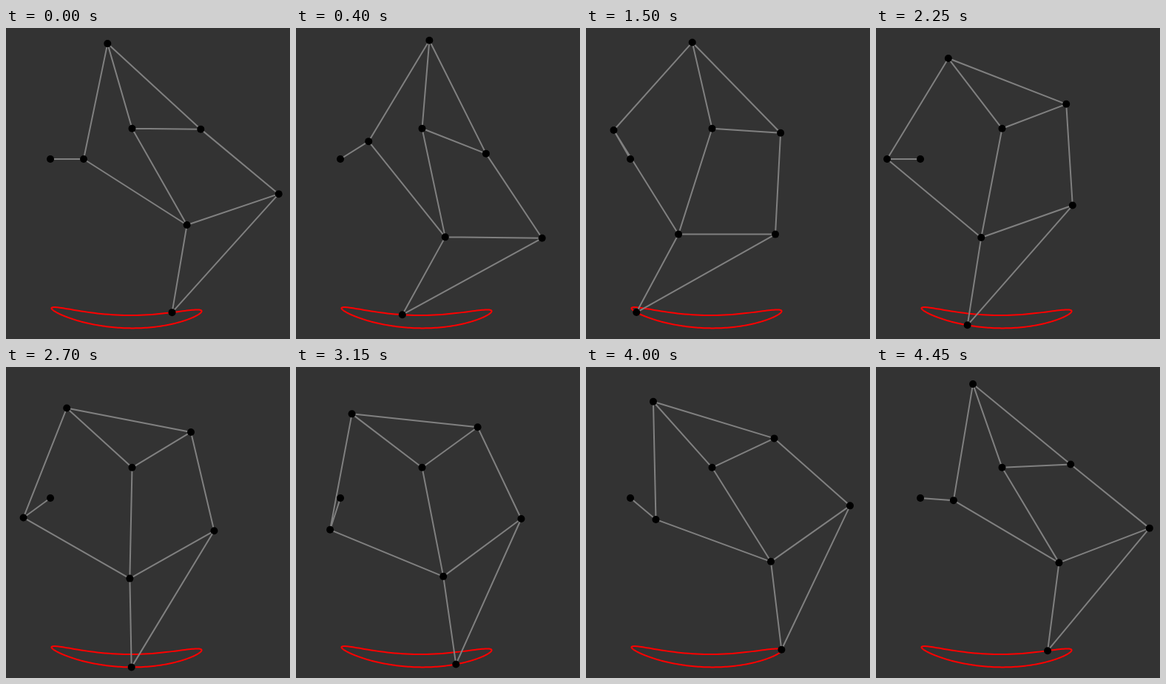
Recreate the animation shown at these times as an HTML page. Size 384 by 420 pixels, loop 4.5 s.

```html
<!DOCTYPE html>
<html lang="en">
<head>
<meta charset="utf-8">
<title>Walking linkage</title>
<style>
  html, body { margin: 0; width: 100%; height: 100%; overflow: hidden; background: #333; }
  svg { display: block; width: 100vw; height: 100vh; }
</style>
</head>
<body>
<svg viewBox="0 0 384 420">
  <path id="track" fill="none" stroke="#f00" stroke-width="2" stroke-linejoin="round"/>
  <path id="links" fill="none" stroke="#808080" stroke-width="2"/>
  <g id="dots"></g>
</svg>
<script>
const LOOP = 4500, STEP = 50;
const hub = [60, 177], pivot = [170.5, 135.8], crankLength = 45;

const trackPath = document.getElementById('track');
const linkPath = document.getElementById('links');
const dotGroup = document.getElementById('dots');

// Point at distance ra from a and rb from b; side picks one of the two solutions.
function joint(a, b, ra, rb, side) {
  const dx = b[0] - a[0], dy = b[1] - a[1];
  const d = Math.hypot(dx, dy);
  const along = (ra * ra - rb * rb + d * d) / (2 * d);
  const off = side * Math.sqrt(Math.max(0, ra * ra - along * along));
  return [
    a[0] + (along * dx + off * dy) / d,
    a[1] + (along * dy - off * dx) / d
  ];
}

function pose(phase) {
  const angle = -2 * Math.PI * phase;
  const crank = [
    hub[0] + crankLength * Math.cos(angle),
    hub[1] + crankLength * Math.sin(angle)
  ];
  const top = joint(crank, pivot, 159.2, 119.4, 1);
  const knee = joint(crank, pivot, 165.6, 149.85, -1);
  const rear = joint(top, pivot, 170.95, 92.8, 1);
  const heel = joint(rear, knee, 137, 130.95, 1);
  const foot = joint(heel, knee, 215.35, 119.8, 1);
  return { crank, top, knee, rear, heel, foot };
}

const polyline = points => 'M' + points.map(p => p[0].toFixed(2) + ' ' + p[1].toFixed(2)).join('L');

const dots = Array.from({ length: 8 }, () => {
  const dot = document.createElementNS('http://www.w3.org/2000/svg', 'circle');
  dot.setAttribute('r', 5);
  return dotGroup.appendChild(dot);
});

function draw(time) {
  const held = Math.floor((time % LOOP) / STEP) * STEP;
  const { crank, top, knee, rear, heel, foot } = pose(held / LOOP);
  linkPath.setAttribute('d', [
    [hub, crank], [crank, top], [crank, knee],
    [top, pivot], [top, rear], [pivot, rear], [pivot, knee],
    [rear, heel], [knee, heel], [knee, foot], [heel, foot]
  ].map(polyline).join(''));
  [hub, pivot, crank, top, knee, rear, heel, foot].forEach((p, i) => {
    dots[i].setAttribute('cx', p[0].toFixed(2));
    dots[i].setAttribute('cy', p[1].toFixed(2));
  });
}

trackPath.setAttribute('d', polyline(Array.from({ length: 180 }, (_, i) => pose(i / 180).foot)) + 'Z');

let start;
function tick(now) {
  start ??= now;
  draw(now - start);
  requestAnimationFrame(tick);
}
draw(0);
requestAnimationFrame(tick);
</script>
</body>
</html>
```
